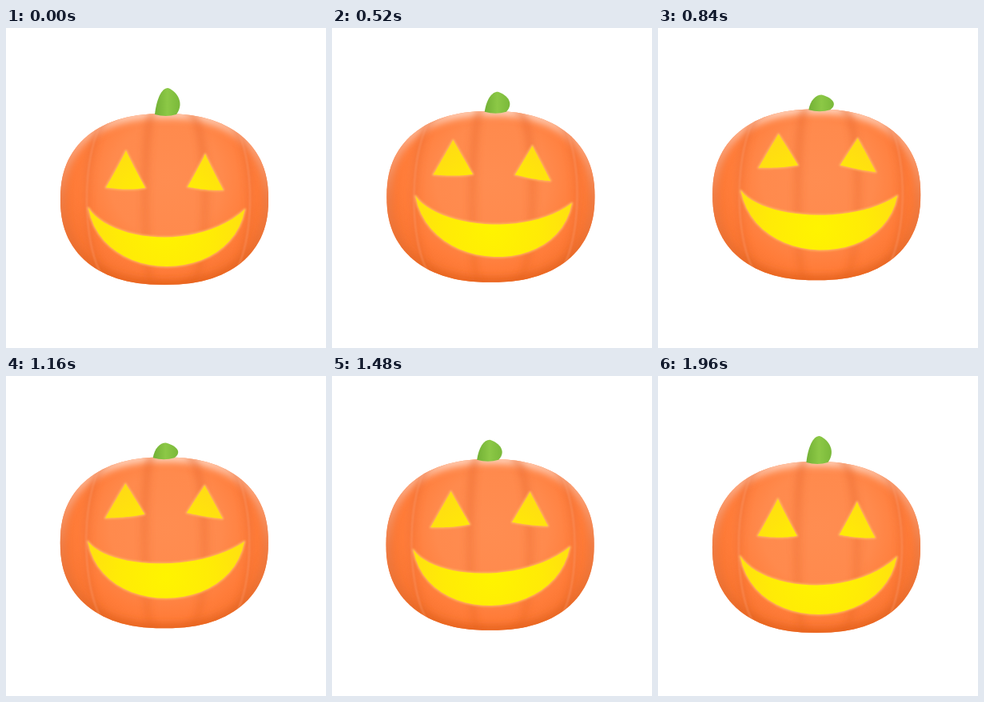
Recreate the animation shown at these times as an HTML page. Size 400 by 400 pixels, loop 2 s.

```html
<!DOCTYPE html>
<html lang="en">
<head>
<meta charset="utf-8">
<title>Pumpkin</title>
<style>
html, body { margin: 0; width: 100%; height: 100%; overflow: hidden; background: #fff; }
svg { display: block; width: 100vw; height: 100vh; }
path { fill: none; stroke-linecap: round; stroke-linejoin: round; }
</style>
</head>
<body>
<svg viewBox="0 0 400 400">
  <defs>
    <radialGradient id="skin" gradientUnits="userSpaceOnUse" cx="200" cy="190" r="140">
      <stop offset="0" stop-color="#ff8d51"/>
      <stop offset=".5" stop-color="#ff8a4d"/>
      <stop offset=".8" stop-color="#ff7c39"/>
      <stop offset="1" stop-color="#f5722f"/>
    </radialGradient>
    <linearGradient id="light" gradientUnits="userSpaceOnUse" x1="0" y1="104" x2="0" y2="318">
      <stop offset="0" stop-color="#ffd2bb"/>
      <stop offset=".2" stop-color="#fba47c"/>
      <stop offset=".5" stop-color="#ee7d47"/>
      <stop offset="1" stop-color="#e8651f"/>
    </linearGradient>
    <linearGradient id="dark" gradientUnits="userSpaceOnUse" x1="0" y1="104" x2="0" y2="318">
      <stop offset="0" stop-color="#e9692f"/>
      <stop offset=".5" stop-color="#e9692f" stop-opacity=".7"/>
      <stop offset="1" stop-color="#e0601f" stop-opacity=".5"/>
    </linearGradient>
    <radialGradient id="glow" gradientUnits="userSpaceOnUse" cx="200" cy="250" r="120">
      <stop offset="0" stop-color="#fff400"/>
      <stop offset=".5" stop-color="#ffeb06"/>
      <stop offset="1" stop-color="#ffdb14"/>
    </radialGradient>
    <linearGradient id="leaf">
      <stop offset="0" stop-color="#72b035"/>
      <stop offset=".5" stop-color="#8cc846"/>
      <stop offset="1" stop-color="#7ab93a"/>
    </linearGradient>
    <filter id="soft" filterUnits="userSpaceOnUse" x="0" y="0" width="400" height="400"><feGaussianBlur stdDeviation="4"/></filter>
    <filter id="fine" filterUnits="userSpaceOnUse" x="0" y="0" width="400" height="400"><feGaussianBlur stdDeviation="1"/></filter>
    <clipPath id="clip"><path id="edge"/></clipPath>
  </defs>
  <path id="body" style="fill:url(#skin)"/>
  <g clip-path="url(#clip)">
    <path id="shell" filter="url(#soft)" stroke="url(#light)" stroke-width="12"/>
    <path id="shade" filter="url(#soft)" stroke="url(#dark)" stroke-width="8" opacity=".55"/>
    <path id="rim" filter="url(#fine)" stroke="#ffa880" stroke-width="1.5" opacity=".5"/>
  </g>
  <path id="stem" style="fill:url(#leaf)"/>
  <path id="halo" filter="url(#fine)" stroke="#ffb35c" stroke-width="3"/>
  <path id="face" style="fill:url(#glow)"/>
</svg>
<script>
const $ = id => document.getElementById(id);
const set = (d, ...ids) => ids.forEach(id => $(id).setAttribute('d', d));
const sample = (n, f) => Array.from({ length: n + 1 }, (_, i) => f(i / n));
const line = pts => 'M' + pts.join('L');

const CX = 198, CY = 211, RX = 130, RY = 107, POWER = 2.3;
const bend = v => Math.sign(v) * Math.abs(v) ** (2 / POWER);

// Point on a Bezier curve of any degree
function bezier(pts, t) {
  while (pts.length > 1)
    pts = pts.slice(1).map(([x, y], i) => [pts[i][0] + (x - pts[i][0]) * t, pts[i][1] + (y - pts[i][1]) * t]);
  return pts[0];
}

const left = [103, 214.5], right = [298.5, 217];
const mouth = [[left, [130, 252], [240, 262], right], [right, [281, 311], [121, 311], left]];
const eye = (top, a, b) => [[top, a], [a, [(a[0] + b[0]) / 2 + 5, (a[1] + b[1]) / 2 + 3], b], [b, top]];
const shapes = [mouth, eye([150, 143], [125, 187], [174, 185]), eye([249, 147], [227, 184], [271.5, 190])];
const seams = [-97, -24, 51, 107];

function draw(now) {
  const angle = Math.floor(now % 2000 / 40) * 40 / 2000 * 2 * Math.PI;
  const nod = Math.cos(angle), sway = Math.sin(angle);
  const cy = CY + nod * 3;

  // Features near the front of the round body move furthest
  const turn = ([x, y]) => {
    const depth = Math.sqrt(Math.max(0, 1 - ((x - CX) / RX) ** 2 - ((y - CY) / RY) ** 2));
    return [x + sway * depth * 2, y + nod * depth * 15.5 + sway * (x - 215) * .032];
  };

  set(line(sample(120, t => {
    const a = t * 2 * Math.PI;
    return [CX + sway * .4 + RX * bend(Math.cos(a)), cy + RY * bend(Math.sin(a))];
  })) + 'Z', 'body', 'edge', 'shell');

  const rib = width => line(sample(24, t => {
    const u = t * 2 - 1;
    return [CX + width * (.64 + .36 * Math.sqrt(1 - u * u)) + sway * (1.5 - u), cy + u * RY];
  }));
  set(seams.map(rib).join(''), 'shade');
  set(rib(seams[0]) + rib(seams[3]), 'rim');

  const tipX = 202.3 + sway * 5, tipY = 79.5 - nod * 4.6;
  const x = 200 + sway * 4.8, y = 105 + nod * 3, mid = (y + tipY) / 2;
  set(`M${x - 14} ${y}C${x - 12} ${mid - 2} ${tipX - 8} ${tipY} ${tipX} ${tipY}
    C${tipX + 8} ${tipY + 2} ${x + 25} ${mid} ${x + 13} ${y}Q${x} ${y + 4} ${x - 14} ${y}`, 'stem');

  set(shapes.map(edges =>
    line(edges.flatMap(pts => sample(24, t => turn(bezier(pts, t))))) + 'Z').join(''), 'halo', 'face');
}

const start = performance.now();
function tick() {
  draw(performance.now() - start);
  requestAnimationFrame(tick);
}
tick();
</script>
</body>
</html>
```
